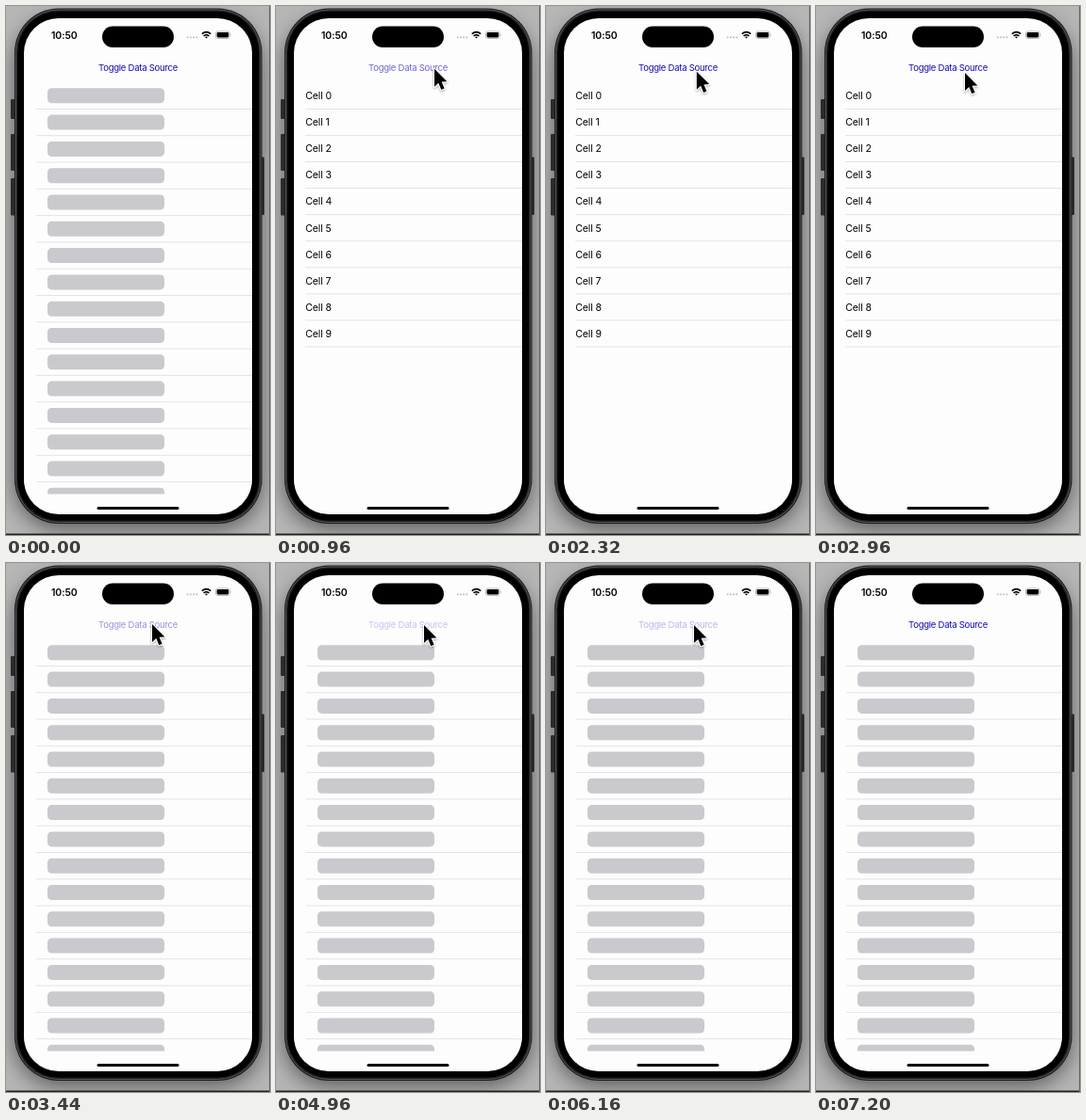
These frames come from a looping animation (280x562 px, 7280 ms). An HTML page:

```html
<!DOCTYPE html>
<html lang="en">
<head>
<meta charset="utf-8">
<title>Toggle Data Source</title>
<style>
  html, body { margin: 0; width: 100%; height: 100%; overflow: hidden; background: #b2b2b2; }
  svg { display: block; width: 280px; height: 562px; }
  text { font-family: Inter, Roboto, "Liberation Sans", sans-serif; }
  .clock { font-size: 10.5px; font-weight: 600; letter-spacing: -.1px; }
  .button { font-size: 9.5px; letter-spacing: -.25px; fill: #1409b4; }
  .cell { font-size: 10.5px; letter-spacing: -.15px; }
  .line { stroke: #e4e4e7; stroke-width: 1; }
  .bar { fill: #c9c9ce; }
</style>
</head>
<body>
<svg viewBox="0 0 280 562">
  <defs>
    <filter id="soft" x="-20%" y="-20%" width="140%" height="140%"><feGaussianBlur stdDeviation="11"/></filter>
    <filter id="drop" x="-50%" y="-50%" width="200%" height="200%">
      <feDropShadow dx="0" dy="1.2" stdDeviation="1.1" flood-opacity=".35"/>
    </filter>
    <clipPath id="list"><rect x="19" y="80" width="242" height="438.5"/></clipPath>
  </defs>

  <rect width="280" height="562" fill="#b6b6b6"/>
  <rect x="9" y="14" width="262" height="542" rx="48" opacity=".5" filter="url(#soft)"/>
  <rect y="560.5" width="280" height="1.5" fill="#222"/>
  <rect x="279" width="1" height="562" fill="#666"/>

  <g fill="#2b2b2c">
    <rect x="5" y="99" width="6" height="21" rx="1"/>
    <rect x="5" y="136" width="6" height="39" rx="1"/>
    <rect x="5" y="183" width="6" height="39.5" rx="1"/>
    <rect x="269" y="160.500" width="5" height="61.500" rx="1"/>
  </g>
  <rect x="9" y="2.500" width="262.500" height="547.500" rx="47" fill="#1c1c1d"/>
  <rect x="10.500" y="4" width="259.500" height="544.500" rx="45.500" fill="none" stroke="#58585a"/>
  <rect x="12.500" y="6" width="255.500" height="540.500" rx="43.500"/>
  <rect x="19" y="13" width="242" height="527" rx="37" fill="#fdfdfd"/>
  <rect x="102" y="21.500" width="76" height="22.500" rx="11.250"/>
  <rect x="96.500" y="532" width="87" height="3" rx="1.500"/>

  <text class="clock" x="48" y="34.500">10:50</text>
  <g fill="#c4c4c6">
    <circle cx="192.700" cy="33.300" r="1.100"/><circle cx="195.900" cy="33.300" r="1.100"/>
    <circle cx="199.100" cy="33.300" r="1.100"/><circle cx="202.300" cy="33.300" r="1.100"/>
  </g>
  <g fill="none" stroke="#000" stroke-width="1.600">
    <path d="M207.800 29.700Q212.500 25.500 217.200 29.700M209.600 31.900Q212.500 29.300 215.400 31.900"/>
    <path d="M211 33L212.500 34.600L214 33Q212.500 31.900 211 33Z" fill="#000" stroke="none"/>
  </g>
  <rect x="222.500" y="27" width="14.800" height="7.500" rx="2.300" fill="none" stroke="#aaa" stroke-width=".8"/>
  <rect x="223.600" y="28.100" width="12.600" height="5.300" rx="1.400"/>
  <path d="M238.400 29.500Q239.600 30.700 238.400 32Z" fill="#aaa"/>

  <text class="button" id="button" x="140" y="69" text-anchor="middle">Toggle Data Source</text>
  <g id="bars" clip-path="url(#list)"></g>
  <g id="cells"></g>
  <path id="cursor" d="M0 0V19L4.300 15.100L7.300 22.200L10.600 20.800L7.600 13.800L13.400 13.400Z"
        stroke="#fff" stroke-width="2" stroke-linejoin="round" paint-order="stroke" filter="url(#drop)"/>
</svg>
<script>
const LOOP = 7280, STEP = 80, FADE = 480;
const SHOW = 320, HIDE = 6560;
const $ = id => document.getElementById(id);

// press and release times; the list toggles on release
const CLICKS = [[560, 720], [3200, 3280], [4960, 5120], [5920, 6080]];

// time, x, y of the pointer tip
const PATH = [
  [320, 172, 80], [560, 168, 67], [1760, 168, 66], [1920, 170, 66],
  [2400, 159, 70], [2960, 158, 71], [3120, 157, 69], [3280, 155, 65],
  [4560, 155, 65], [4800, 157, 66], [6160, 157, 66], [6480, 159, 60]
];

const line = (x, y) => `<line class="line" x1="${x}" x2="261" y1="${y}" y2="${y}"/>`;

let bars = "", cells = "";
for (let i = 0; i < 16; i++) {
  const y = i * 28.3;
  bars += `<rect class="bar" x="44" y="${87.3 + y}" width="124" height="16" rx="4.5"/>` + line(32, 109.4 + y);
}
for (let i = 0; i < 10; i++) {
  const y = i * 28.06;
  cells += `<text class="cell" x="31.300" y="${99.2 + y}">Cell ${i}</text>` + line(31, 109.4 + y);
}
$("bars").innerHTML = bars;
$("cells").innerHTML = cells;

const smooth = p => p * p * (3 - 2 * p);

function pointer(t) {
  const next = PATH.findIndex(p => p[0] > t);
  if (next === 0) return PATH[0].slice(1);
  if (next < 0) return PATH[PATH.length - 1].slice(1);
  const [t0, x0, y0] = PATH[next - 1], [t1, x1, y1] = PATH[next];
  const p = smooth((t - t0) / (t1 - t0));
  return [x0 + (x1 - x0) * p, y0 + (y1 - y0) * p];
}

function buttonAlpha(t) {
  for (const [down, up] of CLICKS) {
    if (t >= down && t < up) return 0.23;
    if (t >= up && t < up + FADE) return 0.23 + 0.77 * smooth((t - up) / FADE);
  }
  return 1;
}

function render(now) {
  const t = Math.floor((now % LOOP) / STEP) * STEP;
  const loaded = CLICKS.filter(c => t >= c[1]).length % 2 === 1;
  $("cells").style.display = loaded ? "" : "none";
  $("bars").style.display = loaded ? "none" : "";
  $("button").style.opacity = buttonAlpha(t);
  $("cursor").style.display = t >= SHOW && t < HIDE ? "" : "none";
  $("cursor").setAttribute("transform", `translate(${pointer(t)})`);
}

const start = performance.now();
function tick() {
  render(performance.now() - start);
  requestAnimationFrame(tick);
}
tick();
</script>
</body>
</html>
```
